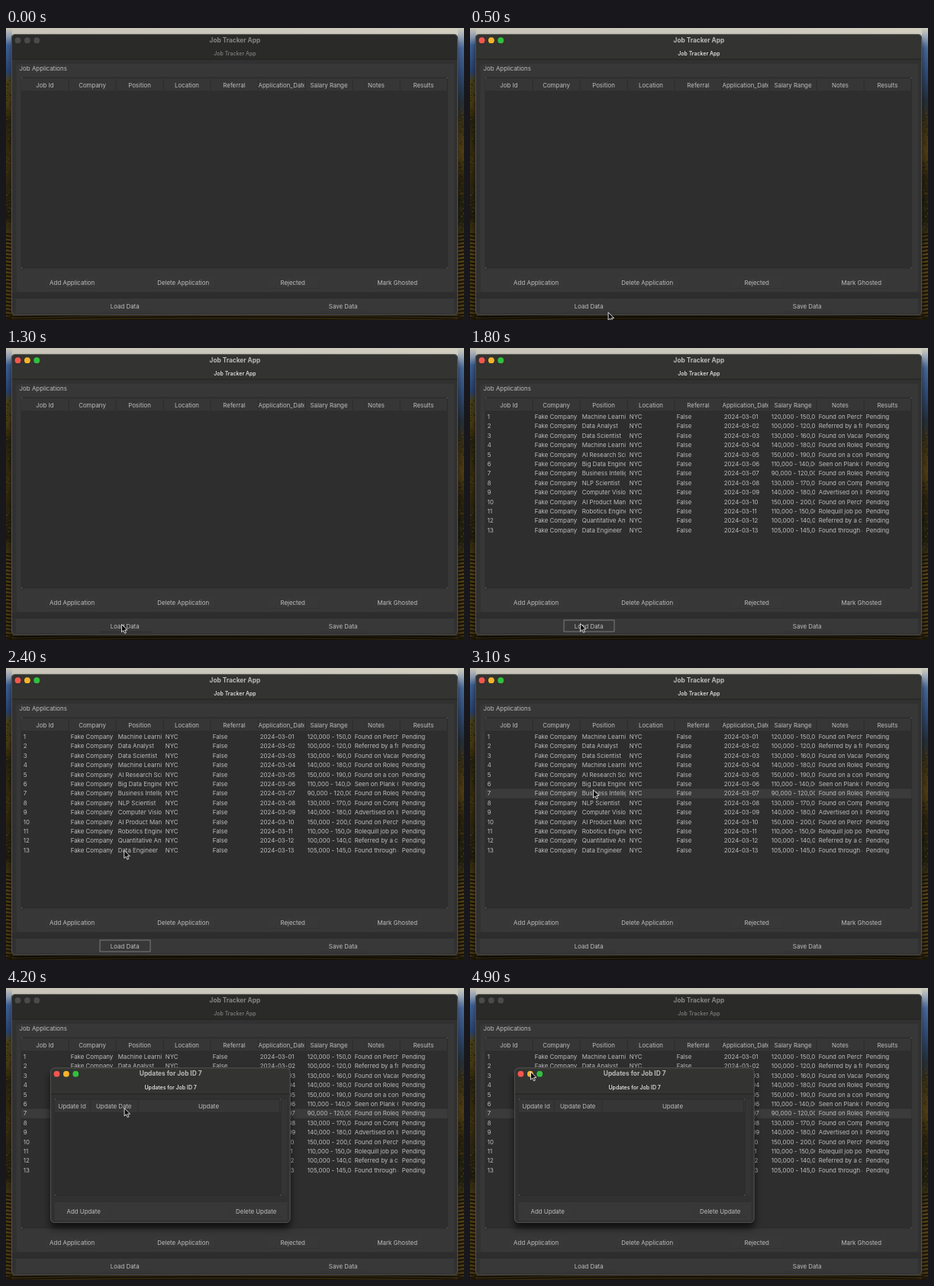
These frames come from a looping animation (600 by 383 pixels, 5000 ms). An HTML page:

```html
<!DOCTYPE html>
<html lang="en">
<head>
<meta charset="utf-8">
<title>Job Tracker App</title>
<style>
html, body { margin: 0; width: 100%; height: 100%; overflow: hidden; background: #222; }
svg { display: block; }
#stage { width: 600px; height: 383px; }
text { font-family: Inter, Roboto, sans-serif; font-size: 7.9px; fill: #bdbdbd; white-space: pre; }
.title { font-size: 8.3px; font-weight: 700; }
.sub { font-size: 7px; font-weight: 500; }
</style>
</head>
<body>
<svg id="stage" viewBox="0 0 600 383">
  <defs>
    <linearGradient id="sky">
      <stop offset="0" stop-color="#c9c5b8"/><stop offset=".5" stop-color="#cbc8bd"/>
      <stop offset="1" stop-color="#d2cec0"/>
    </linearGradient>
    <linearGradient id="left" x2="0" y2="1">
      <stop offset="0" stop-color="#c9c5b8"/><stop offset=".03" stop-color="#8e9cb0"/>
      <stop offset=".06" stop-color="#40649a"/><stop offset=".15" stop-color="#2b4470"/>
      <stop offset=".18" stop-color="#4a431f"/><stop offset=".26" stop-color="#4a3c16"/>
      <stop offset=".32" stop-color="#292410"/><stop offset=".46" stop-color="#3b2f12"/>
      <stop offset=".64" stop-color="#1f1c0e"/><stop offset=".74" stop-color="#5a4518"/>
      <stop offset="1" stop-color="#4e3c16"/>
    </linearGradient>
    <linearGradient id="right" x2="0" y2="1">
      <stop offset="0" stop-color="#d2cec0"/><stop offset=".03" stop-color="#9aa8b9"/>
      <stop offset=".07" stop-color="#4a6c9e"/><stop offset=".16" stop-color="#304c76"/>
      <stop offset=".25" stop-color="#26313c"/><stop offset=".32" stop-color="#3a3217"/>
      <stop offset=".42" stop-color="#543f16"/><stop offset=".52" stop-color="#2a240f"/>
      <stop offset=".66" stop-color="#212111"/><stop offset=".75" stop-color="#5a4518"/>
      <stop offset="1" stop-color="#4e3c16"/>
    </linearGradient>
    <filter id="blur" x="-20%" y="-20%" width="140%" height="140%"><feGaussianBlur stdDeviation="5"/></filter>
  </defs>
  <g id="desk"></g>
  <g id="main"></g>
  <g id="dialog"></g>
  <path id="cursor" d="M0 0V10.2L2.4 8L4.1 11.8L5.9 11L4.2 7.4H7.5Z" fill="#080808" stroke="#eee" stroke-width=".9" stroke-linejoin="round"/>
</svg>
<script>
const NS = 'http://www.w3.org/2000/svg';
const $ = id => document.getElementById(id);
const LOOP = 5000, STEP = 100;
const ACTIVATE = 500, LOAD = 1500, SELECT = 2800, OPEN = 3500;

function add(parent, tag, attrs, content) {
  const el = document.createElementNS(NS, tag);
  for (const k in attrs) el.setAttribute(k, attrs[k]);
  if (content !== undefined) el.textContent = content;
  parent.appendChild(el);
  return el;
}
const rect = (g, x, y, width, height, fill, more) => add(g, 'rect', { x, y, width, height, fill, ...more });
const line = (g, x1, y1, x2, y2, stroke, w = .7) => add(g, 'line', { x1, y1, x2, y2, stroke, 'stroke-width': w });
const label = (g, x, y, s, more) => add(g, 'text', { x, y: y + 2.8, ...more }, s);
const mid = (g, x, y, s, more) => label(g, x, y, s, { 'text-anchor': 'middle', ...more });
const show = (el, on) => el.setAttribute('visibility', on ? 'visible' : 'hidden');

function button(g, cx, cy, w, s) {
  const x = cx - w / 2, y = cy - 7;
  const edge = rect(g, x, y + .6, w, 14, '#303030', { rx: 1.5 });
  rect(g, x, y, w, 14, '#383838', { rx: 1.5 });
  mid(g, cx - .3, cy, s);
  return edge;
}

// Window chrome; returns a function that sets the focused look.
function chrome(g, x, y, w, h, title, subY, edge) {
  const shadow = rect(g, x, y + 7, w, h, '#000', { rx: 6, filter: 'url(#blur)' });
  rect(g, x, y, w, h, '#313131', { rx: 5.5 });
  const bar = add(g, 'path', { d: `M${x} ${edge}V${y + 5.5}q0-5.5 5.5-5.5H${x + w - 5.5}q5.5 0 5.5 5.5V${edge}Z` });
  line(g, x, edge, x + w, edge, '#1c1c1c');
  rect(g, x + .4, y + .4, w - .8, h - .8, 'none', { rx: 5.2, stroke: '#5b5b5b', 'stroke-width': .8 });
  const cx = x + w / 2;
  const head = mid(g, cx + .4, y + 8, title, { class: 'title' });
  const sub = mid(g, cx + .4, subY, title, { class: 'sub' });
  const lights = [0, 1, 2].map(i => add(g, 'circle', { cx: x + 8.5 + 12.4 * i, cy: y + 8.2, r: 3.9 }));
  return on => {
    shadow.setAttribute('opacity', on ? .65 : .45);
    bar.setAttribute('fill', on ? '#333331' : '#2a2a29');
    head.style.fill = on ? '#b9b9b8' : '#858585';
    sub.style.fill = on ? '#f2f2f2' : '#808080';
    lights.forEach((c, i) => c.setAttribute('fill', on ? ['#f4564e', '#f5b429', '#2fc13d'][i] : '#4b4b4b'));
  };
}

function table(g, x, y, w, h, cols, heads) {
  rect(g, x, y, w, h, '#2e2e2e', { stroke: '#282828', 'stroke-width': .6 });
  rect(g, x, y + 1, w, 17, '#363636');
  line(g, x, y + 18, x + w, y + 18, '#2a2a2a');
  heads.forEach((s, i) => {
    const a = cols[i], b = cols[i + 1];
    const cell = add(g, 'svg', { x: a, y, width: b - a - 1.6, height: 18 });
    mid(cell, (b - a) / 2 + (s.length > 15 ? .7 : -.3), 9.7, s);
    line(g, b, y + 2, b, y + 17, '#292929');
  });
  for (const px of [x, x + w - 1]) for (const py of [y, y + h - 1]) rect(g, px, py, 1, 1, '#777');
}

// Desktop: sky, hills, trees and vineyard rows around the window
let seed = 7;
const rand = () => (seed = seed * 16807 % 2147483647) / 2147483647;
const desk = $('desk');
rect(desk, 0, 0, 300, 383, 'url(#left)');
rect(desk, 300, 0, 300, 383, 'url(#right)');
rect(desk, 8, 0, 584, 14, 'url(#sky)');
for (let i = 0; i < 300; i++) {
  const x = rand() * 9 + (i % 2 ? 591 : 0), y = (i % 2 ? 105 : 68) + rand() * 195;
  rect(desk, x, y, 1.5, 1.5, rand() < .6 ? '#15130a' : '#6b521c', { opacity: .5 });
}
for (let i = 0; i < 24; i++) {
  const y = 270 + i * 4.8;
  line(desk, 0, y, 9, y + 1.2, '#1a160a', 2.2);
  line(desk, 591, y + 1.2, 600, y, '#1a160a', 2.2);
}
rect(desk, 8, 372, 584, 11, '#4c3b17');
for (let i = 0; i < 3; i++) {
  const y = 376 + i * 3.2;
  add(desk, 'path', { d: `M0 ${y + 3}Q300 ${y - 4} 600 ${y + 3}`, fill: 'none', stroke: '#1d180b', 'stroke-width': 1.5 });
}

// Main window
const main = $('main');
const focusMain = chrome(main, 7, 8, 585, 368.6, 'Job Tracker App', 33.5, 41);
rect(main, 13, 47, 574, 299, '#343434', { rx: 1 });
rect(main, 15.5, 48, 570, 297, '#373737', { rx: 2, stroke: '#3d3d3d', 'stroke-width': .6 });
label(main, 17.6, 53, 'Job Applications');
const colX = Array.from({ length: 10 }, (_, i) => 20.3 + 62 * i);
table(main, 20, 65, 558.5, 250, colX,
  ['Job Id', 'Company', 'Position', 'Location', 'Referral', 'Application_Date', 'Salary Range', 'Notes', 'Results']);
button(main, 87, 334, 72, 'Add Application');
button(main, 232.5, 334, 82, 'Delete Application');
button(main, 376, 334, 69, 'Rejected');
button(main, 513, 334, 69, 'Mark Ghosted');
rect(main, 8, 347, 583, 7.5, '#2d2d2d');
rect(main, 13, 355, 574, 19, '#383838');
const loadEdge = button(main, 156, 365, 68, 'Load Data');
button(main, 442, 365, 68, 'Save Data');
const ring = rect(main, 123, 357, 66, 15, 'none', { stroke: '#8d8d8d', 'stroke-width': .8 });

const jobs = `Machine Learning Engineer|120|150|Found on Perchlane
Data Analyst|100|120|Referred by a friend
Data Scientist|130|160|Found on Vacantora
Machine Learning Engineer|140|180|Found on Rolequill
AI Research Scientist|150|190|Found on a conference page
Big Data Engineer|110|140|Seen on Plank Corner
Business Intelligence|90|120|Found on Rolequill
NLP Scientist|130|170|Found on Company site
Computer Vision Engineer|140|180|Advertised on Industry list
AI Product Manager|150|200|Found on Perchlane
Robotics Engineer|110|150|Rolequill job post
Quantitative Analyst|100|140|Referred by a colleague
Data Engineer|105|145|Found through a recruiter`.split('\n').map(s => s.split('|'));

const rowY = i => 90.2 + 12.4 * i;
const mark = rect(main, 20, rowY(6) - 6.2, 558.5, 12.4, '#3b3b3b');
const rows = add(main, 'g', {});
jobs.forEach(([role, low, high, note], i) => {
  const day = String(i + 1).padStart(2, '0');
  [i + 1, 'Fake Company', role, 'NYC', 'False', '2024-03-' + day,
    `${low},000 - ${high},000`, note, 'Pending'].forEach((s, c) => {
    const cell = add(rows, 'svg', { x: colX[c], y: rowY(i) - 6.2, width: 59.7, height: 12.4 });
    label(cell, 2.4, 6.2, s);
  });
});

// Updates dialog
const dialog = $('dialog');
const focusDialog = chrome(dialog, 58, 104.5, 314.5, 203.5, 'Updates for Job ID 7', 130, 139);
table(dialog, 64, 145.5, 296, 126.5, [64, 110, 173, 358.5], ['Update Id', 'Update Date', 'Update']);
rect(dialog, 361, 146, 7, 126, '#343434');
rect(dialog, 64, 281, 304.5, 24, '#383838');
button(dialog, 102, 293.5, 69, 'Add Update');
button(dialog, 328, 293.5, 69, 'Delete Update');
focusDialog(true);

// Pointer path: time, x, y
const path = [
  [200, 196, 384], [700, 173, 367], [900, 171, 364.5], [1300, 151.5, 362.5],
  [1800, 144.5, 361.5], [2000, 144.5, 361.5], [2700, 161.5, 160], [3300, 161.5, 160],
  [3600, 159.5, 160.5], [4100, 159.5, 160.5], [4800, 79.5, 110], [5000, 79.5, 110]
];
function pointer(t) {
  const i = Math.max(1, path.findIndex(p => p[0] > t));
  const [a, b] = [path[i - 1], path[i]];
  const u = Math.min(1, Math.max(0, (t - a[0]) / (b[0] - a[0])));
  const e = u * u * (3 - 2 * u);
  return [a[1] + (b[1] - a[1]) * e, a[2] + (b[2] - a[2]) * e];
}

function draw(t) {
  focusMain(t >= ACTIVATE && t < OPEN);
  show(rows, t >= LOAD);
  show(ring, t >= LOAD && t < SELECT);
  show(mark, t >= SELECT);
  show(dialog, t >= OPEN);
  loadEdge.setAttribute('fill', t >= 800 && t < LOAD ? '#1f1f1f' : '#303030');
  show($('cursor'), t >= path[0][0]);
  $('cursor').setAttribute('transform', `translate(${pointer(t)})`);
}

const start = performance.now();
function tick() {
  const t = (performance.now() - start) % LOOP;
  draw(Math.floor(t / STEP) * STEP);
  requestAnimationFrame(tick);
}
draw(0);
requestAnimationFrame(tick);
</script>
</body>
</html>
```
